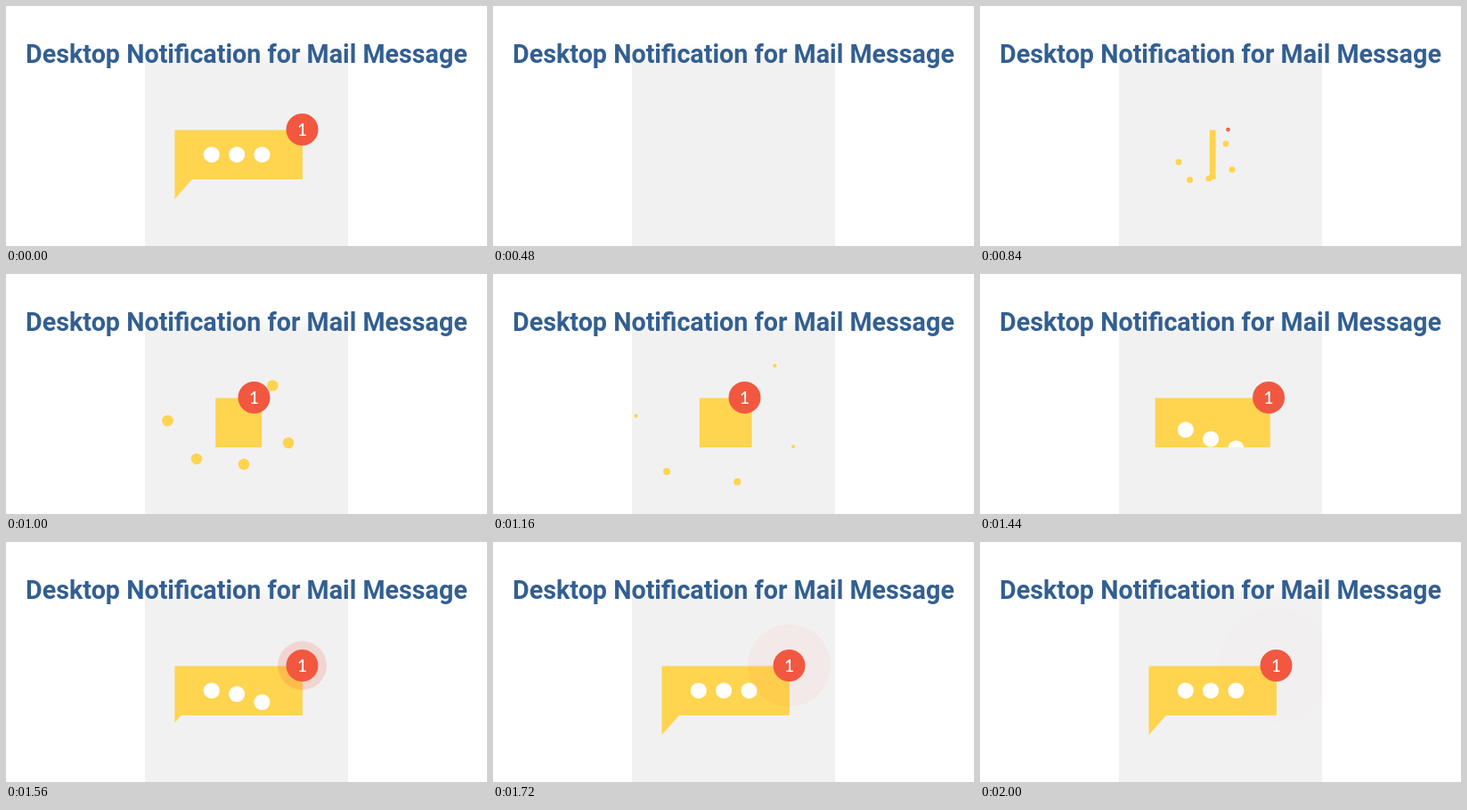
An HTML page with a canvas that plays this animation: 540x270 px, repeating every 2.08 s.

```html
<!DOCTYPE html>
<html lang="en">
<head>
<meta charset="utf-8">
<title>Desktop Notification</title>
<style>
  html, body { margin: 0; width: 100%; height: 100%; overflow: hidden; background: #fff; }
  canvas { display: block; }
</style>
</head>
<body>
<canvas id="stage" width="540" height="270"></canvas>
<script>
const ctx = document.getElementById('stage').getContext('2d');
const LOOP = 2080, STEP = 40;
const YELLOW = '#ffd44f', RED = '#f25840', BLUE = '#335f91';
const CX = 261.2, TOP = 139.5, BOTTOM = 195;

// Sparks: positions at 640, 840 and 1000 ms and at the end of life
const sparks = [
  { end: 1240, path: [[259, 184], [223, 175.5], [181.5, 165], [150, 157]] },
  { end: 1440, path: [[261, 181], [235.5, 195.5], [214, 208], [162, 247]] },
  { end: 1440, path: [[250, 180], [257, 194], [267, 214], [287, 268]] },
  { end: 1240, path: [[260, 179], [283, 184], [317, 190], [347, 196]] },
  { end: 1240, path: [[261, 174], [276, 155], [299.3, 125.5], [325, 92]] }
];

const lerp = (a, b, p) => a + (b - a) * p;
const span = (t, a, b) => Math.min(1, Math.max(0, (t - a) / (b - a)));
const ease = p => p * p * (3 - 2 * p);

function disc(x, y, r, color) {
  if (r <= 0) return;
  ctx.fillStyle = color;
  ctx.beginPath();
  ctx.arc(x, y, r, 0, Math.PI * 2);
  ctx.fill();
}

function label(text, x, y, font, color) {
  ctx.font = font;
  ctx.textAlign = 'center';
  ctx.fillStyle = color;
  ctx.fillText(text, x, y);
}

function drawBackdrop() {
  ctx.fillStyle = '#fff';
  ctx.fillRect(0, 0, 540, 270);
  const fade = ctx.createLinearGradient(0, 42, 0, 66);
  fade.addColorStop(0, '#fff');
  fade.addColorStop(1, '#f1f1f1');
  ctx.fillStyle = fade;
  ctx.fillRect(156, 42, 228, 228);
}

function drawSpark({ end, path }, t) {
  if (t <= 640 || t >= end) return;
  const times = [640, 840, 1000, end];
  const i = t < 840 ? 0 : t < 1000 ? 1 : 2;
  const p = span(t, times[i], times[i + 1]);
  const [a, b] = [path[i], path[i + 1]];
  const r = 6.3 * (t < 1000 ? span(t, 640, 1000) : 1 - span(t, 1000, end));
  disc(lerp(a[0], b[0], p), lerp(a[1], b[1], p), r, YELLOW);
}

function drawBubble(t, grow, slide) {
  const half = grow * lerp(26, 71.7, slide);
  if (half <= 0) return;
  ctx.fillStyle = YELLOW;
  ctx.fillRect(CX - half, TOP, half * 2, BOTTOM - TOP);

  const tail = span(t, 1500, 1660);
  if (tail > 0) {
    ctx.beginPath();
    ctx.moveTo(CX - half, BOTTOM - 0.5);
    ctx.lineTo(CX - half, BOTTOM + 22 * tail);
    ctx.lineTo(CX - half + 20 * tail, BOTTOM - 0.5);
    ctx.fill();
  }

  ctx.save();
  ctx.beginPath();
  ctx.rect(CX - half, TOP, half * 2, BOTTOM - TOP);
  ctx.clip();
  for (let i = 0; i < 3; i++) {
    const start = 1160 + i * 80;
    const y = lerp(204.2, 167.2, ease(span(t, start, start + 400)));
    disc(230.8 + i * 28.3, y, 9, '#fff');
  }
  ctx.restore();
}

function drawHalo(t, x) {
  if (t < 1480 || t >= LOOP) return;
  const p = span(t, 1480, 1870);
  const alpha = 0.27 * (1 - p) ** 2 + 0.012;
  disc(x, 139, lerp(18, 64, p), `rgba(242, 88, 64, ${alpha})`);
}

function drawBadge(x, scale) {
  if (scale <= 0) return;
  ctx.save();
  ctx.translate(x, 139);
  ctx.scale(scale, scale);
  disc(0, 0, 18, RED);
  label('1', 0, 7, '500 19px Lato, sans-serif', '#fff');
  ctx.restore();
}

function draw(t) {
  // The finished bubble holds first, then the build-up replays
  if (t < 480) t = LOOP;
  const grow = span(t, 816, 1000);
  const slide = ease(span(t, 1080, 1560));
  const badgeX = lerp(278.5, 332.5, slide);

  drawBackdrop();
  ctx.save();
  ctx.beginPath();
  ctx.rect(156, 42, 228, 228);
  ctx.clip();
  sparks.forEach(s => drawSpark(s, t));
  drawBubble(t, grow, slide);
  drawHalo(t, badgeX);
  drawBadge(badgeX, grow);
  ctx.restore();
  label('Desktop Notification for Mail Message', 270, 64, '700 28.7px Roboto, sans-serif', BLUE);
}

function tick() {
  const t = performance.now() % LOOP;
  draw(Math.floor(t / STEP) * STEP);
  requestAnimationFrame(tick);
}
tick();
</script>
</body>
</html>
```
